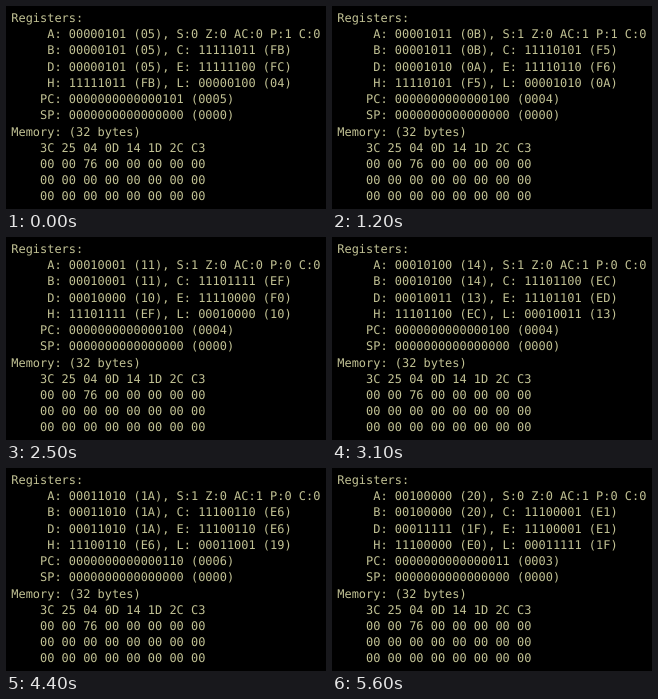
An HTML page that plays this animation: 320 px wide and 203 px high, repeating every 5.7 s.

```html
<!DOCTYPE html>
<html lang="en">
<head>
<meta charset="utf-8">
<style>
  html, body { margin: 0; width: 100%; height: 100%; overflow: hidden; background: #000; }
  svg { display: block; width: 100vw; height: 100vh; }
  text {
    font: 11.94px "DejaVu Sans Mono", "Liberation Mono", monospace;
    text-rendering: geometricPrecision;
    fill: #c2c294;
    white-space: pre;
  }
</style>
</head>
<body>
<svg viewBox="0 0 320 203"></svg>
<script>
const LOOP = 5700, FRAME = 100, LINES = 12;
const memory = [0x3C, 0x25, 0x04, 0x0D, 0x14, 0x1D, 0x2C, 0xC3, 0, 0, 0x76, ...Array(21).fill(0)];

// [time in ms, instructions executed so far]
const pace = [[0, 37], [700, 64], [1700, 103], [2500, 132], [3800, 183], [5000, 229], [5600, 251]];

const hex = (n, width = 2) => n.toString(16).toUpperCase().padStart(width, '0');
const bin = (n, width = 8) => n.toString(2).padStart(width, '0');

function instructionsAt(time) {
  const i = Math.max(1, pace.findIndex(([t]) => t >= time));
  const [t0, n0] = pace[i - 1], [t1, n1] = pace[i];
  return Math.round(n0 + (n1 - n0) * (time - t0) / (t1 - t0));
}

// Runs the INR / DCR / JMP subset of the 8080.
function run(count) {
  const reg = { B: 0, C: 0, D: 0, E: 0, H: 0, L: 0, M: 0, A: 0 };
  const flags = { S: 0, Z: 0, AC: 0, P: 0, C: 0 };
  let pc = 0;
  while (count--) {
    const op = memory[pc++];
    if (op === 0xC3) {
      pc = memory[pc] | memory[pc + 1] << 8;
      continue;
    }
    const name = 'BCDEHLMA'[op >> 3], decrement = op & 1;
    const value = reg[name] = (reg[name] + (decrement ? 255 : 1)) & 255;
    flags.S = value >> 7;
    flags.Z = +(value === 0);
    flags.AC = +(decrement ? (value & 15) !== 15 : (value & 15) === 0);
    flags.P = +(bin(value).split('1').length % 2 === 1);
  }
  return { reg, flags, pc };
}

function screen({ reg, flags, pc }) {
  const byte = name => `${name}: ${bin(reg[name])} (${hex(reg[name])})`;
  const word = (name, n) => `    ${name}: ${bin(n, 16)} (${hex(n, 4)})`;
  const pair = (a, b) => `     ${byte(a)}, ${byte(b)}`;
  const status = Object.entries(flags).map(([k, v]) => `${k}:${v}`).join(' ');
  const row = i => '    ' + memory.slice(i * 8, i * 8 + 8).map(n => hex(n)).join(' ');
  return [
    'Registers:',
    `     ${byte('A')}, ${status}`,
    pair('B', 'C'), pair('D', 'E'), pair('H', 'L'),
    word('PC', pc), word('SP', 0),
    'Memory: (32 bytes)',
    row(0), row(1), row(2), row(3)
  ];
}

const svg = document.querySelector('svg');
const lines = Array.from({ length: LINES }, (_, i) => {
  const line = document.createElementNS(svg.namespaceURI, 'text');
  line.setAttribute('x', 5.3);
  line.setAttribute('y', 15.9 + i * 16.23);
  return svg.appendChild(line);
});

function draw(time) {
  const step = Math.floor(time % LOOP / FRAME) * FRAME;
  screen(run(instructionsAt(step))).forEach((text, i) => {
    if (lines[i].textContent !== text) lines[i].textContent = text;
  });
}

const start = performance.now();
function tick() {
  draw(performance.now() - start);
  requestAnimationFrame(tick);
}
tick();
</script>
</body>
</html>
```
